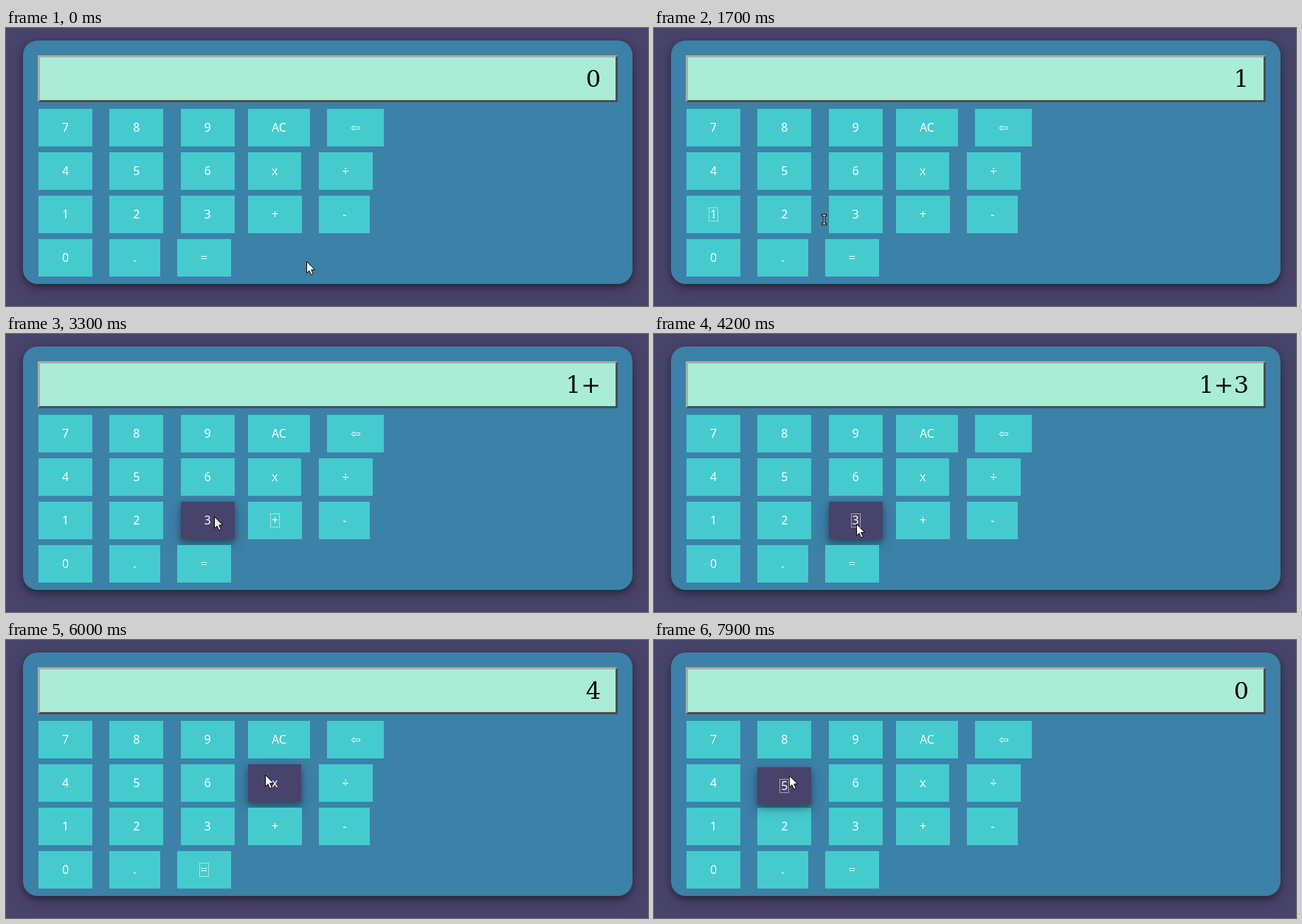
Recreate the animation shown at these times as an HTML page. Size 870 px wide and 378 px high, loop 8000 ms.

```html
<!DOCTYPE html>
<html lang="en">
<head>
<meta charset="utf-8">
<title>Calculator</title>
<style>
  :root { --dark: #48436a; --shade: 0 4px 8px 0 rgba(0,0,0,.32), 0 6px 20px 0 rgba(0,0,0,.19); }
  html, body { margin: 0; width: 100%; height: 100%; overflow: hidden; background: var(--dark); }
  #panel { position: absolute; left: 23px; top: 17px; width: 826px; height: 331px;
    border-radius: 20px; background: #3c81a8; box-shadow: var(--shade); }
  #display { position: absolute; left: 43px; top: 37px; width: 786px; height: 64px; box-sizing: border-box;
    border: 3px solid; border-color: #aaa #4d4d55 #4d4d55 #aaa; padding-right: 20px;
    background: #a9edd6; color: #000; font: 32px/58px "DejaVu Serif", serif; text-align: right; }
  #keys { position: absolute; left: 44px; top: 110px; }
  .row { display: flex; gap: 23.15px; margin-bottom: 8px; }
  .key { position: relative; height: 51px; padding: 0 32px; background: #45cbce; color: #fff;
    font: 16px/51px "Noto Sans", "DejaVu Sans", sans-serif; }
  .key:nth-child(4) { margin-left: -5px; }
  .hover { background: var(--dark); box-shadow: var(--shade); }
  .down { transform: translateY(4px); z-index: 1; }
  .focus::after { content: ""; position: absolute; inset: 16px 30px; border: 1px dotted #fff; }
  svg { position: absolute; left: 0; top: 0; z-index: 2; overflow: visible; }
</style>
</head>
<body>
<div id="panel"></div>
<div id="display">0</div>
<div id="keys"></div>
<svg id="cursor" width="14" height="20">
  <defs><path id="bar" d="M-1.5 -5.5H2.5M.5 -5.5V6.5M-1.5 6.5H2.5" stroke-linecap="square"/></defs>
  <path id="arrow" d="M.5 .5V16.2L4 12.9L6.6 18.9L9.3 17.7L6.7 11.8H11.7Z" fill="#fff" stroke="#000"/>
  <g id="beam">
    <use href="#bar" stroke="#000" stroke-width="3"/>
    <use href="#bar" stroke="#fff"/>
  </g>
</svg>
<script>
const LOOP = 8000, STEP = 100;
const $ = id => document.getElementById(id);

const add = (parent, cls, text = "") => {
  const el = document.createElement("div");
  el.className = cls;
  el.textContent = text;
  return parent.appendChild(el);
};

const keys = ["7 8 9 AC ⇦", "4 5 6 x ÷", "1 2 3 + -", "0 . ="].flatMap(line => {
  const row = add($("keys"), "row");
  return line.split(" ").map(label => ({ label, el: add(row, "key", label) }));
});
for (const key of keys) key.box = key.el.getBoundingClientRect();

// pointer moves: first step, last step, end point
const home = [407, 317];
const moves = [
  [4, 8, 157, 265], [10, 12, 103, 262], [16, 19, 356, 257], [21, 22, 381, 257],
  [29, 31, 287, 248], [33, 34, 277, 248], [42, 46, 262, 298],
  [56, 60, 351, 183], [61, 64, 365, 133], [72, 78, 183, 184]
];
const presses = [[13, "1"], [25, "+"], [36, "3"], [47, "="], [66, "AC"], [79, "5"]];

function pointer(n) {
  let [x, y] = home;
  for (const [first, last, tx, ty] of moves) {
    const k = Math.min(1, Math.max(0, (n - first + 1) / (last - first + 1)));
    x += (tx - x) * k;
    y += (ty - y) * k;
  }
  return [Math.round(x), Math.round(y)];
}

// a key takes effect one step after it is pressed
function calc(n) {
  let text = "0";
  for (const [at, label] of presses) {
    if (at >= n) break;
    if (label === "AC") text = "0";
    else if (label === "=") text = String(text.split("+").reduce((sum, v) => sum + +v, 0));
    else text = text === "0" ? label : text + label;
  }
  return text;
}

function draw(n) {
  const [x, y] = pointer(n);
  const [at, pressed] = presses.filter(([s]) => s <= n).pop() || [];
  const down = n === at;
  const inRow = keys.filter(({ box }) => y >= box.top && y < box.bottom);
  const over = inRow.find(({ box }) => x >= box.left && x < box.right);
  for (const key of keys) {
    const active = key.label === pressed;
    key.el.classList.toggle("hover", key === over);
    key.el.classList.toggle("down", active && down);
    key.el.classList.toggle("focus", active && (down || pressed !== "AC"));
  }
  // text pointer in the spaces between keys of a row
  const beam = !over && inRow.some(k => k.box.left > x) && inRow.some(k => k.box.left < x);
  $("arrow").style.display = beam ? "none" : "";
  $("beam").style.display = beam ? "" : "none";
  $("cursor").style.transform = `translate(${x}px,${y}px)`;
  $("display").textContent = calc(n);
}

const start = performance.now();
let last = -1;
function tick() {
  const n = Math.floor((performance.now() - start) % LOOP / STEP);
  if (n !== last) draw(last = n);
  requestAnimationFrame(tick);
}
tick();
</script>
</body>
</html>
```
